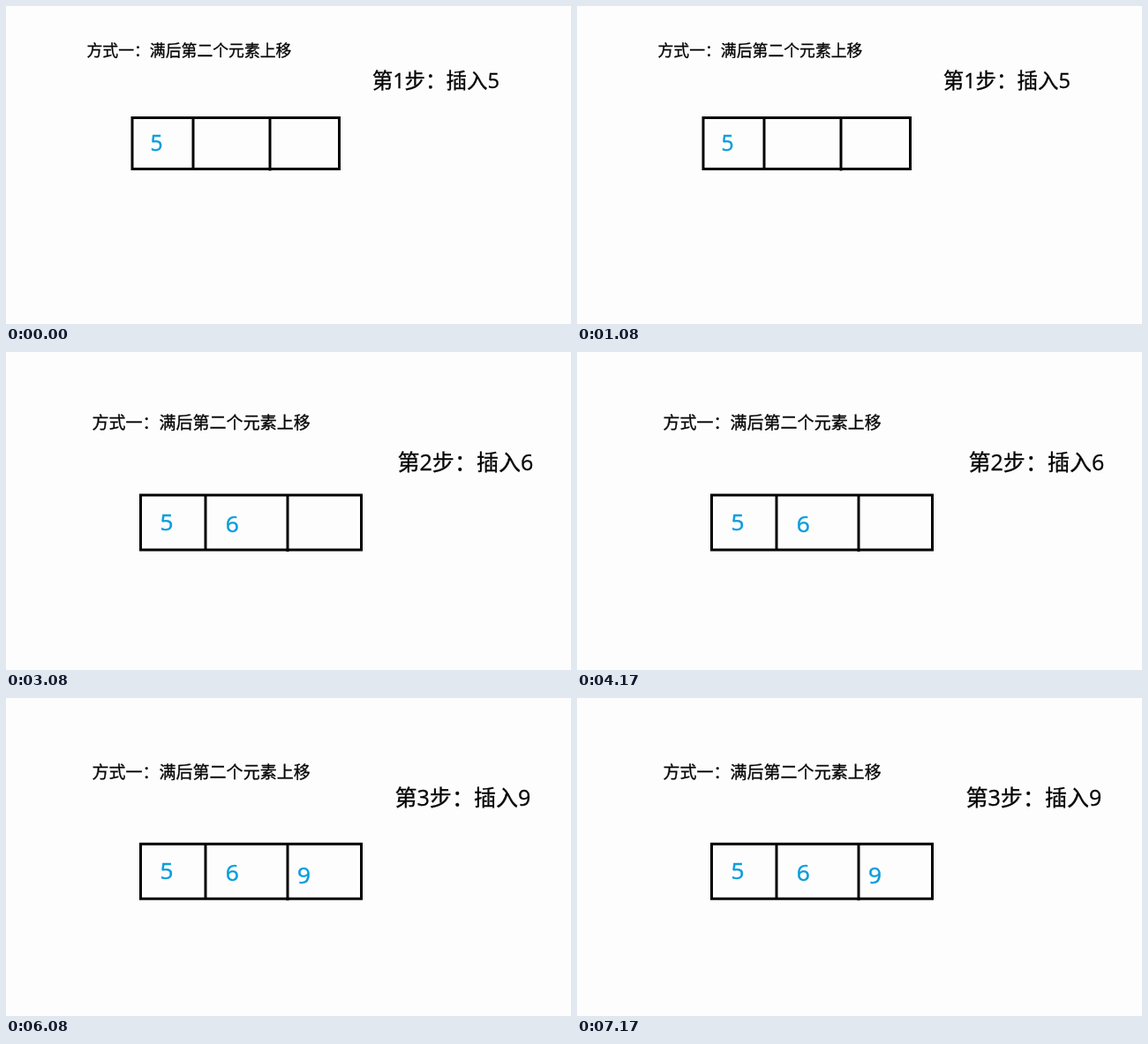
These frames come from a looping animation (640 by 360 pixels, 8 s). An HTML page:

```html
<!DOCTYPE html>
<html lang="zh-CN">
<head>
<meta charset="utf-8">
<style>
html, body { margin: 0; width: 100%; height: 100%; overflow: hidden; background: #fdfdfd; }
svg { display: block; width: 640px; height: 360px; }
text { font-family: "Open Sans", "Noto Sans CJK SC", "Noto Sans CJK", sans-serif; fill: #050505; stroke: #050505; stroke-width: 0.3; }
.digit { fill: #0a9cdc; stroke: #0a9cdc; stroke-width: 0.5; text-anchor: middle; }
path { fill: none; stroke: #020202; stroke-width: 3; }
</style>
</head>
<body>
<svg id="stage" viewBox="0 0 640 360"></svg>
<script>
const LOOP = 8000;
const TITLE = '方式一：满后第二个元素上移';

// box: left, top, right, bottom; cells: [digit, centre x, baseline]
const steps = [
  { start: 0, end: 3080, scale: 1, title: [91.5, 56.8], label: [414.7, 92.6], text: '第1步：插入5',
    box: [143, 126.4, 377.5, 184.4], dividers: [212, 299], cells: [['5', 170.5, 164.2]] },
  { start: 3080, end: 6080, scale: 1.066, title: [97.5, 87.2], label: [443.5, 133.8], text: '第2步：插入6',
    box: [152.5, 162, 402.5, 224], dividers: [226, 319], cells: [['5', 182, 202.2], ['6', 256.2, 204]] },
  { start: 6080, end: LOOP, scale: 1.066, title: [97.5, 91.2], label: [440.5, 122.3], text: '第3步：插入9',
    box: [152.5, 165.3, 402.5, 227.3], dividers: [226, 319],
    cells: [['5', 182, 205.4], ['6', 256.2, 207.2], ['9', 337.5, 209.6]] }
];

const stage = document.getElementById('stage');

function add(parent, tag, attrs, content = '') {
  const node = document.createElementNS('http://www.w3.org/2000/svg', tag);
  for (const key in attrs) node.setAttribute(key, attrs[key]);
  node.textContent = content;
  return parent.appendChild(node);
}

function write(parent, content, [x, y], size, attrs = {}) {
  add(parent, 'text', { x, y, 'font-size': size, ...attrs }, content);
}

function build({ scale, title, label, text, box, dividers, cells }) {
  const group = add(stage, 'g', {});
  const [left, top, right, bottom] = box;
  const [first, last] = dividers;
  write(group, TITLE, title, 17.85 * scale);
  write(group, text, label, 23.5 * scale);
  add(group, 'path', {
    d: `M${left} ${top}H${right}V${bottom}H${left}ZM${first} ${top}V${bottom}M${last} ${top}V${bottom + 2}`
  });
  for (const [digit, x, y] of cells) write(group, digit, [x, y], 24.6 * scale, { class: 'digit' });
  return group;
}

const groups = steps.map(build);

function draw() {
  const t = performance.now() % LOOP;
  steps.forEach(({ start, end }, i) => {
    groups[i].style.display = t >= start && t < end ? '' : 'none';
  });
  requestAnimationFrame(draw);
}
draw();
</script>
</body>
</html>
```
